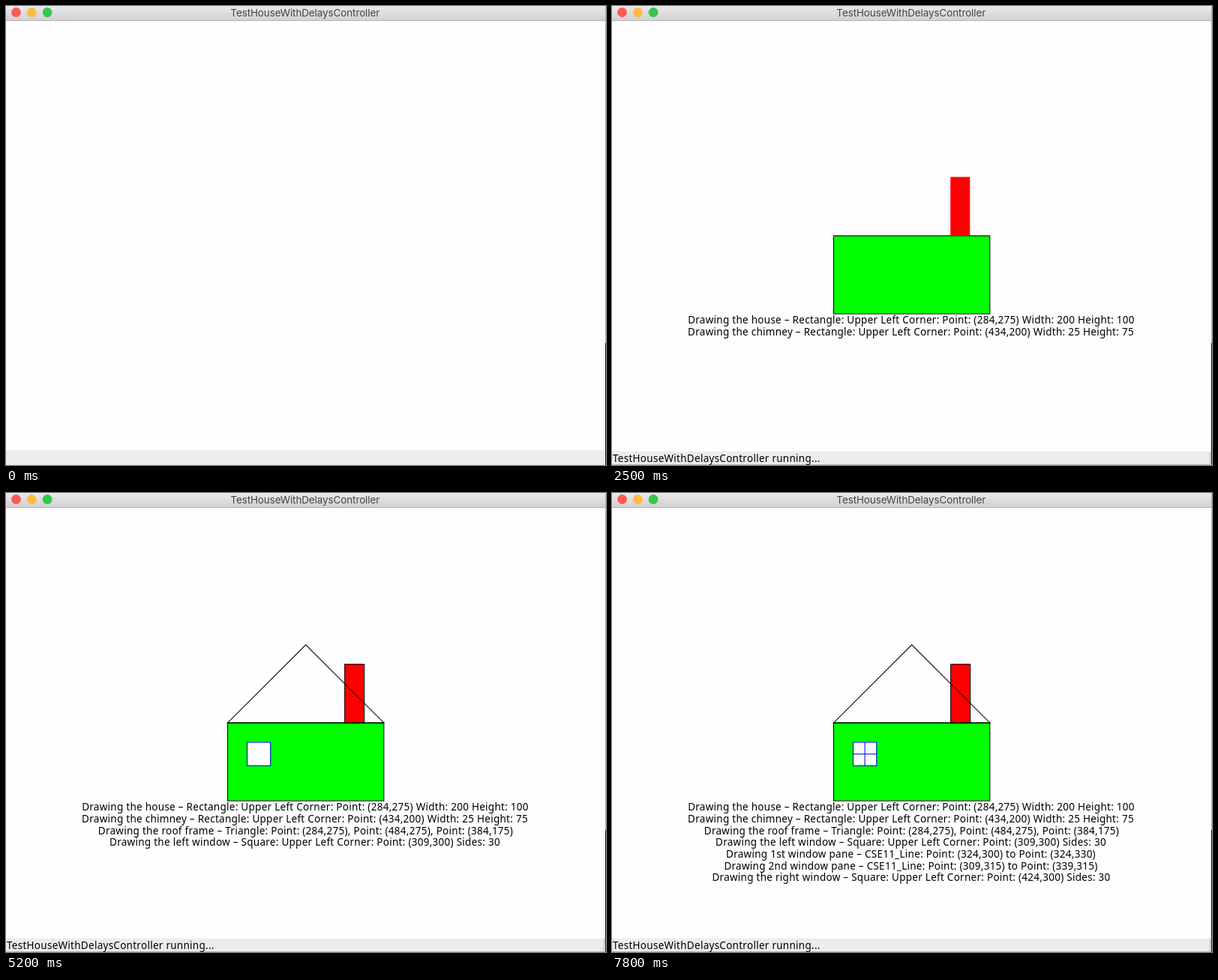
An HTML page that plays this animation: 800 px wide and 613 px high, repeating every 8000 ms.

```html
<!DOCTYPE html>
<html lang="en">
<head>
<meta charset="utf-8">
<title>TestHouseWithDelaysController</title>
<style>
  html, body { margin: 0; width: 100%; height: 100%; overflow: hidden; }
  svg { display: block; }
  text { font: 13.5px "Noto Sans", sans-serif; letter-spacing: .27px; }
  .title { font: 13.4px Inter, sans-serif; letter-spacing: -.06px; fill: #454345; text-anchor: middle; }
  .line { text-anchor: middle; }
  .shape { transform: translate(-.35px, 20.5px) scale(1.0417); }
  .outline { fill: none; stroke: #000; }
  .pane { fill: none; stroke: #00f; }
</style>
</head>
<body>
<svg width="800" height="613" viewBox="0 0 800 613">
  <defs>
    <linearGradient id="bar" x2="0" y2="1">
      <stop stop-color="#ebe9eb"/>
      <stop offset="1" stop-color="#d2d0d2"/>
    </linearGradient>
  </defs>

  <rect width="800" height="613" fill="#fefdff"/>
  <rect width="800" height="19" fill="url(#bar)"/>
  <rect y="19" width="800" height="1" fill="#b5b3b5"/>
  <circle cx="13.5" cy="8.5" r="6.4" fill="#fc5b57"/>
  <circle cx="34.3" cy="8.5" r="6.4" fill="#fdbc40"/>
  <circle cx="55.1" cy="8.5" r="6.4" fill="#34c84a"/>
  <text class="title" x="398.8" y="13.5">TestHouseWithDelaysController</text>
  <rect y="593" width="800" height="20" fill="#ececec"/>

  <!-- Each child is one drawing step; shapes use the 768-wide canvas coordinates -->
  <g id="steps">
    <g>
      <rect y="593" width="800" height="2" fill="#fefdff"/>
      <path d="M0 612.5H798M797.5 595V613" stroke="#b8b8b8"/>
      <text x="1" y="609">TestHouseWithDelaysController running...</text>
      <text class="line" x="399" y="424.4">Drawing the house – Rectangle: Upper Left Corner: Point: (284,275) Width: 200 Height: 100</text>
    </g>
    <rect class="shape" x="283.5" y="274.5" width="200" height="100" fill="#0f0"/>
    <rect class="shape outline" x="284" y="275" width="200" height="100"/>
    <text class="line" x="398.5" y="440">Drawing the chimney – Rectangle: Upper Left Corner: Point: (434,200) Width: 25 Height: 75</text>
    <rect class="shape" x="433.5" y="199.5" width="25" height="75" fill="red"/>
    <rect class="shape outline" x="434" y="200" width="25" height="75"/>
    <text class="line" x="399.5" y="455.7">Drawing the roof frame – Triangle: Point: (284,275), Point: (484,275), Point: (384,175)</text>
    <path class="shape outline" d="M284 275H484L384 175Z"/>
    <text class="line" x="398.5" y="471.3">Drawing the left window – Square: Upper Left Corner: Point: (309,300) Sides: 30</text>
    <rect class="shape" x="308.5" y="299.5" width="30" height="30" fill="#fefdff"/>
    <rect class="shape pane" x="309" y="300" width="30" height="30"/>
    <text class="line" x="398.5" y="486.9">Drawing 1st window pane – CSE11_Line: Point: (324,300) to Point: (324,330)</text>
    <path class="shape pane" d="M324 300V330"/>
    <text class="line" x="398.5" y="502.5">Drawing 2nd window pane – CSE11_Line: Point: (309,315) to Point: (339,315)</text>
    <path class="shape pane" d="M309 315H339"/>
    <text class="line" x="399" y="518.2">Drawing the right window – Square: Upper Left Corner: Point: (424,300) Sides: 30</text>
  </g>

  <rect x="799" y="0" width="1" height="450" fill="#b2b0b2"/>
  <rect x="799" y="450" width="1" height="163" fill="#111"/>
</svg>
<script>
  const LOOP = 8000, TICK = 100, START = 90, DELAY = 505;
  const steps = [...document.getElementById('steps').children];

  function render(now) {
    const time = Math.floor(now % LOOP / TICK) * TICK;
    steps.forEach((step, i) => {
      step.style.display = time >= START + i * DELAY ? '' : 'none';
    });
  }

  const begin = performance.now();
  function loop() {
    render(performance.now() - begin);
    requestAnimationFrame(loop);
  }
  loop();
</script>
</body>
</html>
```
